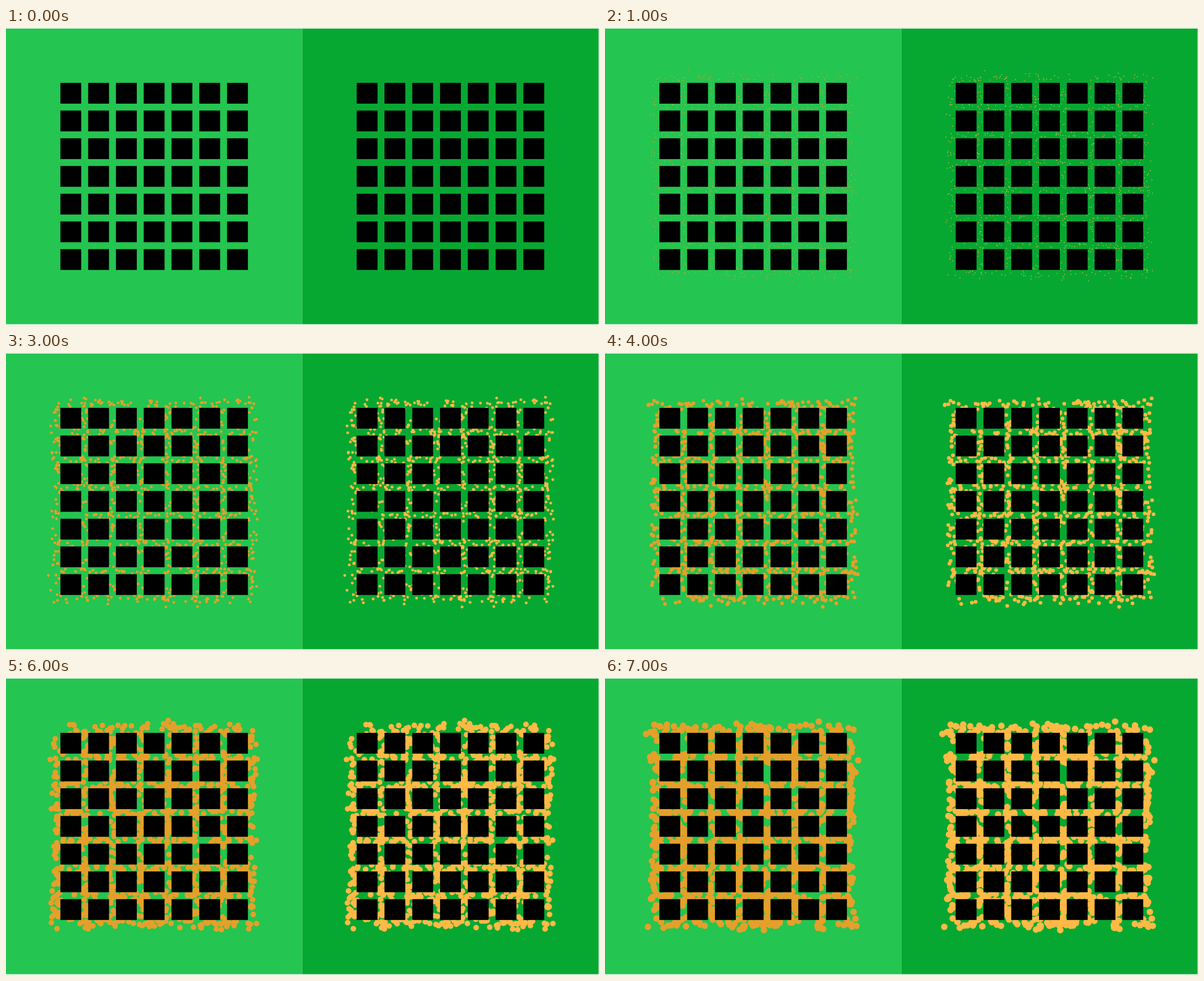
These frames come from a looping animation (1056 by 530 pixels, 8 s). An HTML page with a canvas:

```html
<!DOCTYPE html>
<html lang="en">
<head>
<meta charset="utf-8">
<title>Grids with growing dots</title>
<style>
html, body { margin: 0; width: 100%; height: 100%; overflow: hidden; background: #fff; }
canvas { display: block; width: 1056px; height: 530px; }
</style>
</head>
<body>
<canvas id="stage" width="1056" height="530"></canvas>
<script>
const ctx = document.getElementById("stage").getContext("2d");
const STEP = 1000, STEPS = 8;
const SIDE = 527.65, TOP = 1;
const COUNT = 7, PITCH = SIDE * 3 / 32, SIZE = PITCH * 0.75;
const SPAN = COUNT * PITCH, EDGE = (SIDE - SPAN) / 2;
const DOTS_PER_LINE = 64, GROWTH = 0.83;
const panels = [
  { back: "#24c550", dot: "#e4a02a" },
  { back: "#07a831", dot: "#ffb946" }
];

function seeded(seed) {
  return () => {
    seed = (seed + 0x6d2b79f5) | 0;
    let t = Math.imul(seed ^ (seed >>> 15), 1 | seed);
    t = (t + Math.imul(t ^ (t >>> 7), 61 | t)) ^ t;
    return ((t ^ (t >>> 14)) >>> 0) / 4294967296;
  };
}

// Scatter dots along the lines between the squares, a little past both ends.
function scatter(step) {
  const random = seeded(step * 977);
  const spread = reach => (random() * 2 - 1) * reach;
  const dots = [];
  for (let line = 0; line <= COUNT; line++) {
    for (let i = 0; i < DOTS_PER_LINE * 2; i++) {
      const along = EDGE + random() * SPAN + spread(PITCH * 0.39);
      const across = EDGE + line * PITCH + spread(6) + spread(6);
      dots.push(i % 2 ? [along, across] : [across, along]);
    }
  }
  return dots;
}

const layouts = Array.from({ length: STEPS }, (_, step) => scatter(step));

function drawDots(step) {
  if (!step) return;
  for (const [x, y] of layouts[step]) {
    ctx.beginPath();
    ctx.arc(x, y, step * GROWTH, 0, Math.PI * 2);
    ctx.fill();
  }
}

function drawSquares() {
  const inset = EDGE + (PITCH - SIZE) / 2;
  for (let row = 0; row < COUNT; row++)
    for (let col = 0; col < COUNT; col++)
      ctx.fillRect(inset + col * PITCH, inset + row * PITCH, SIZE, SIZE);
}

function draw(step) {
  ctx.fillStyle = "#fff";
  ctx.fillRect(0, 0, 1056, 530);
  panels.forEach(({ back, dot }, i) => {
    ctx.save();
    ctx.translate(i * SIDE, TOP);
    ctx.fillStyle = back;
    ctx.fillRect(0, 0, SIDE, SIDE);
    ctx.fillStyle = dot;
    drawDots(step);
    ctx.fillStyle = "#000";
    drawSquares();
    ctx.restore();
  });
}

let shown = 0;
const start = performance.now();
function tick() {
  const step = Math.floor((performance.now() - start) / STEP) % STEPS;
  if (step !== shown) draw(shown = step);
  requestAnimationFrame(tick);
}
draw(0);
requestAnimationFrame(tick);
</script>
</body>
</html>
```
